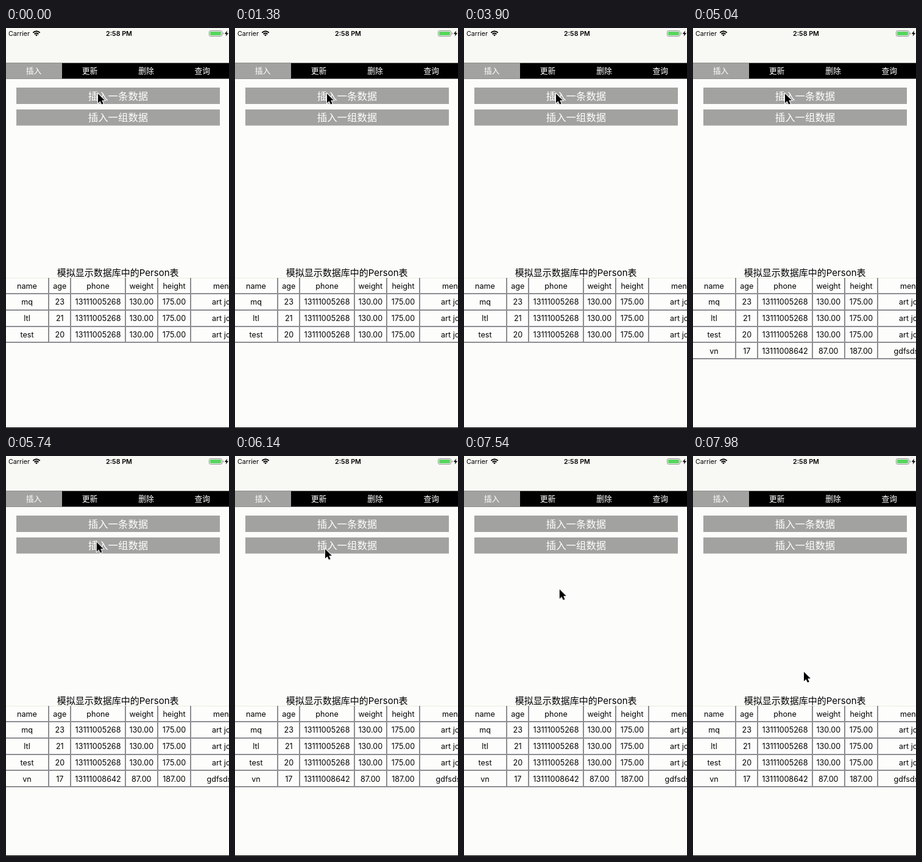
Animation, 366 px wide and 658 px high, one loop 8 s. Source, as an HTML page:

```html
<!DOCTYPE html>
<html lang="zh-CN">
<head>
<meta charset="utf-8">
<title>Person</title>
<style>
html, body { margin: 0; width: 100%; height: 100%; overflow: hidden; background: #fcfcfa; }
svg { display: block; width: 366px; height: 658px; font-family: Inter, "Noto Sans CJK SC", "Noto Sans CJK", sans-serif; }
.mid { text-anchor: middle; }
.tab { font-size: 12.8px; fill: #fff; }
.btn { font-size: 16.4px; fill: #fff; }
.cell { font-size: 12.6px; }
.gray { fill: #a2a2a0; }
.line { fill: none; stroke: #8c8c92; stroke-width: 2; }
#added { animation: show 8s step-end infinite; }
#cursor { animation: move 8s infinite; }
@keyframes show {
  0% { visibility: hidden; }
  51.5% { visibility: visible; }
}
@keyframes move {
  0%, 68.5% { transform: translate(151px, 108px); animation-timing-function: ease-in-out; }
  73.5%, 78.5% { transform: translate(148px, 153px); animation-timing-function: ease-in-out; }
  83.75%, 89% { transform: translate(133px, 91px); animation-timing-function: ease-in-out; }
  99.7%, 100% { transform: translate(182px, 355px); }
}
</style>
</head>
<body>
<svg viewBox="0 0 366 658">
  <rect width="366" height="658" fill="#fcfcfa"/>
  <rect width="366" height="57.5" fill="#f8f8f5"/>

  <!-- status bar -->
  <text x="4" y="13" font-size="10.7">Carrier</text>
  <g fill="none" stroke="#000" stroke-width="1.9">
    <path d="M44.3 7.8Q50 2.6 55.7 7.8M46.5 10.1Q50 7 53.5 10.1"/>
    <path d="M48 11.2Q50 9.6 52 11.2L50 13.6Z" fill="#000" stroke="none"/>
  </g>
  <text class="mid" x="185.5" y="13" font-size="10.7" font-weight="600">2:58 PM</text>
  <rect x="333.5" y="4.5" width="21" height="9" rx="2.2" fill="none" stroke="#8c8c8c"/>
  <rect x="335" y="6" width="18" height="6" rx="1" fill="#55d55c"/>
  <path d="M356 7.3v3.4q1.4-.5 1.4-1.7t-1.4-1.7z" fill="#8c8c8c"/>
  <path d="M363.2 4.2L358.7 9.7H361.6L360.6 13.8L365.2 8.2H362.2Z"/>

  <!-- tabs -->
  <rect y="57.5" width="366" height="26" fill="#000"/>
  <rect class="gray" y="57.5" width="92" height="26"/>
  <g class="mid tab">
    <text x="45.5" y="75.3">插入</text>
    <text x="137.6" y="75.3">更新</text>
    <text x="230" y="75.3">删除</text>
    <text x="322.3" y="75.3">查询</text>
  </g>

  <rect class="gray" x="17" y="98" width="334" height="27"/>
  <rect class="gray" x="17" y="134" width="334" height="26.5"/>
  <g class="mid btn">
    <text x="184" y="117.6">插入一条数据</text>
    <text x="184" y="153.2">插入一组数据</text>
  </g>

  <!-- table -->
  <text class="mid" x="183.7" y="407.5" font-size="15">模拟显示数据库中的Person表</text>
  <rect y="411" width="366" height="106" fill="#fdfdfc"/>
  <path d="M0 411.5H366" stroke="#ececdc"/>
  <path class="line" d="M0 437H366M0 464H366M0 491H366M0 517H366M70 411V518M106 411V518M196 411V518M249 411V518M303 411V518"/>
  <g id="rows" class="cell"></g>
  <g id="added">
    <path class="line" d="M0 544H366M70 518V545M106 518V545M196 518V545M249 518V545M303 518V545"/>
    <g id="extra" class="cell"></g>
  </g>
  <path d="M0 657.5H366" stroke="#000"/>

  <path id="cursor" d="M0 0V15.4L3.5 12.2L6 17.6L8.7 16.4L6.3 11.1H11Z" stroke="#fff" stroke-width="2" paint-order="stroke"/>
</svg>
<script>
const centers = [34.5, 88.3, 151, 222.3, 276];
const data = [
  ["name", "age", "phone", "weight", "height", "mento", 340],
  ["mq", "23", "13111005268", "130.00", "175.00", "art job", 338],
  ["ltl", "21", "13111005268", "130.00", "175.00", "art job", 338],
  ["test", "20", "13111005268", "130.00", "175.00", "art job", 338],
  ["vn", "17", "13111008642", "87.00", "187.00", "gdfsdsf", 329.5]
];

function put(group, text, x, y, cls) {
  const t = document.createElementNS("http://www.w3.org/2000/svg", "text");
  t.setAttribute("x", x);
  t.setAttribute("y", y);
  t.setAttribute("class", cls);
  t.textContent = text;
  group.append(t);
}

data.forEach((row, i) => {
  const group = document.getElementById(i < 4 ? "rows" : "extra");
  const y = 428.7 + 26.75 * i;
  centers.forEach((x, c) => put(group, row[c], x, y, "mid"));
  put(group, row[5], row[6], y, "");
});
</script>
</body>
</html>
```
